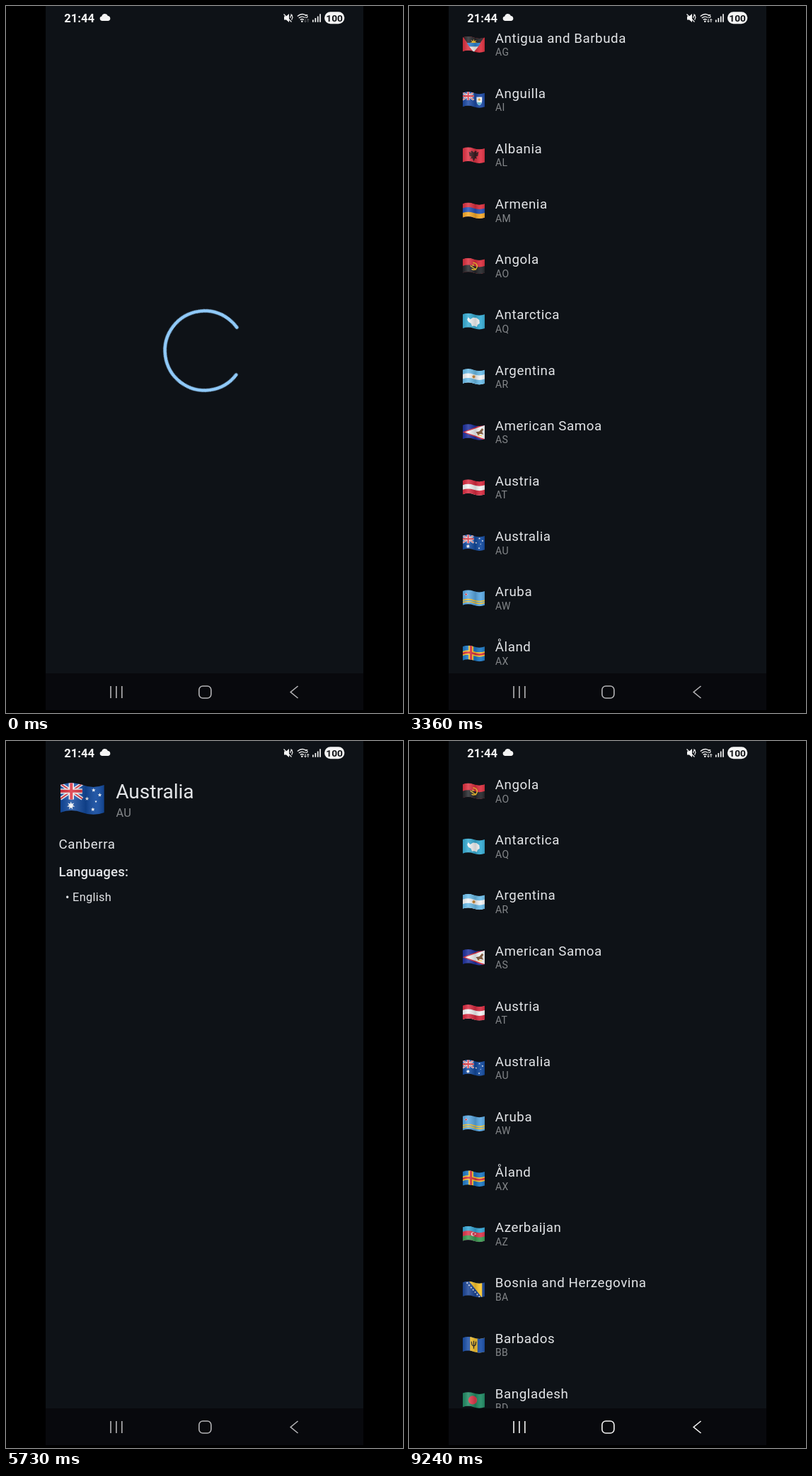
These frames come from a looping animation (561x998 px, 9.27 s). An HTML page:

```html
<!DOCTYPE html>
<html lang="en">
<head>
<meta charset="utf-8">
<title>Country list</title>
<style>
  html, body { margin: 0; width: 100%; height: 100%; overflow: hidden; background: #000; }
  svg { display: block; width: 100vw; height: 100vh; font-family: Roboto, sans-serif; }
  .name { font-size: 18.7px; letter-spacing: .584px; fill: #e3e5e8; }
  .code { font-size: 14.03px; letter-spacing: .468px; fill: #84878a; }
  .body { font-size: 16.37px; letter-spacing: .29px; fill: #e3e5e8; }
  .title { font-size: 28.05px; fill: #e3e5e8; }
  .label { font-size: 18.7px; font-weight: 500; letter-spacing: .175px; fill: #e3e5e8; }
  .bold { font-weight: 700; }

  /* One shared 9.27 s loop; 1 % is 92.7 ms. */
  .anim { animation: 9.27s linear infinite; }
  #loader { animation-name: loader; }
  #spin { animation-name: spin; transform-origin: 280.7px 486.5px; }
  #arc { animation-name: arc; }
  #arrows { animation-name: arrows; }
  #list { animation-name: list; }
  #rows { animation-name: scroll; }
  #detail { animation-name: detail; }
  #ripple { animation-name: ripple; transform-box: fill-box; transform-origin: center; }
  #press { animation-name: press; }
  #nav { animation-name: nav; }
  #touch { animation-name: touch; }

  @keyframes loader { 0%, 13.37% { opacity: 1 } 13.376%, 100% { opacity: 0 } }
  @keyframes spin {
    0% { transform: rotate(37.1deg) }
    7.551%, 100% { transform: rotate(187.4deg) }
  }
  @keyframes arc {
    0% { stroke-dasharray: 287 400; stroke-dashoffset: 0 }
    .798% { stroke-dasharray: 290 400; stroke-dashoffset: 0; animation-timing-function: cubic-bezier(.4, 0, .2, 1) }
    7.983%, 100% { stroke-dasharray: .5 400; stroke-dashoffset: -289.5 }
  }
  @keyframes arrows { 0%, 9.81% { opacity: .35 } 9.817%, 100% { opacity: 1 } }
  @keyframes list {
    0%, 13.37% { opacity: 0 }
    13.376% { opacity: 1 }
    53.614% { opacity: 1; animation-timing-function: cubic-bezier(.4, 0, .2, 1) }
    61.165%, 87.594% { opacity: 0; animation-timing-function: cubic-bezier(.4, 0, .2, 1) }
    91.154%, 100% { opacity: 1 }
  }
  @keyframes detail {
    0% { opacity: 0 }
    53.614% { opacity: 0; animation-timing-function: cubic-bezier(.4, 0, .2, 1) }
    61.165%, 87.594% { opacity: 1; animation-timing-function: cubic-bezier(.4, 0, .2, 1) }
    91.154%, 100% { opacity: 0 }
  }
  @keyframes scroll {
    0%, 32.03% { transform: translateY(0) }
    32.039% { transform: translateY(-20px) }
    33.765% { transform: translateY(-145px) }
    34.951% { transform: translateY(-200px) }
    36.246% { transform: translateY(-248.5px) }
    37.756% { transform: translateY(-286px) }
    40.129% { transform: translateY(-318px) }
    40.561% { transform: translateY(-320px) }
    42.071% { transform: translateY(-361px) }
    43.15% { transform: translateY(-398px) }
    44.444% { transform: translateY(-416px); animation-timing-function: ease-out }
    46.71%, 93.2% { transform: translateY(-424.4px) }
    93.528% { transform: translateY(-438px) }
    94.822% { transform: translateY(-489.9px) }
    96.009% { transform: translateY(-527px) }
    97.303% { transform: translateY(-539px); animation-timing-function: ease-out }
    99.676%, 100% { transform: translateY(-545px) }
  }
  @keyframes ripple {
    0%, 51.67% { opacity: 0; transform: scale(.6) }
    52.5% { opacity: .1; transform: scale(.8) }
    54.1% { opacity: .1; transform: scale(1) }
    56.3%, 100% { opacity: 0; transform: scale(1) }
  }
  @keyframes press {
    0%, 81.12% { opacity: 0 }
    82%, 83.2% { opacity: .14 }
    85.653%, 100% { opacity: 0 }
  }
  @keyframes nav { 0%, 81.12% { stroke: #b4b4b6 } 81.5%, 100% { stroke: #f4f4f4 } }
  @keyframes touch {
    0%, 32.03% { opacity: 0; transform: translate(152px, 650px) }
    32.039% { opacity: 1; transform: translate(152px, 650px) }
    33.765% { opacity: 1; transform: translate(158px, 530px) }
    35.7% { opacity: 0; transform: translate(158px, 530px) }
    40.12% { opacity: 0; transform: translate(125px, 660px) }
    40.129% { opacity: 1; transform: translate(125px, 660px) }
    40.561% { opacity: 1; transform: translate(124px, 655px) }
    43.15% { opacity: 1; transform: translate(101px, 547px) }
    46.71% { opacity: .03; transform: translate(101px, 547px) }
    51.66% { opacity: .03; transform: translate(101px, 547px) }
    51.672% { opacity: 1; transform: translate(300px, 580px) }
    52.6% { opacity: 1; transform: translate(300px, 580px) }
    54.5% { opacity: 0; transform: translate(300px, 580px) }
    81.11% { opacity: 0; transform: translate(410px, 968px) }
    81.122%, 82.2% { opacity: 1; transform: translate(410px, 968px) }
    84.5% { opacity: 0; transform: translate(410px, 968px) }
    93.19% { opacity: 0; transform: translate(157px, 690px) }
    93.204% { opacity: 1; transform: translate(157px, 690px) }
    94.822% { opacity: 1; transform: translate(150px, 614px) }
    96.009% { opacity: 1; transform: translate(137px, 572px) }
    99.676%, 100% { opacity: 0; transform: translate(137px, 572px) }
  }
</style>
</head>
<body>
<svg viewBox="0 0 561 998">
  <defs>
    <clipPath id="wave"><path d="M0 0q8-3 16 0t16 0v20q-8 3-16 0t-16 0z"/></clipPath>
    <clipPath id="page"><rect x="56" y="30" width="449" height="912"/></clipPath>
    <clipPath id="row"><rect x="56" y="543" width="449" height="78"/></clipPath>
    <linearGradient id="shade">
      <stop offset="0" stop-opacity=".1"/>
      <stop offset=".25" stop-color="#fff" stop-opacity=".16"/>
      <stop offset=".58" stop-opacity=".16"/>
      <stop offset=".82" stop-color="#fff" stop-opacity=".08"/>
      <stop offset="1" stop-opacity=".14"/>
    </linearGradient>
  </defs>

  <rect width="561" height="998"/>
  <rect x="56" width="449" height="942" fill="#0e1217"/>
  <rect x="56" y="942" width="449" height="52" fill="#08090d"/>

  <g id="loader" class="anim">
    <g id="spin" class="anim">
      <circle id="arc" class="anim" cx="280.7" cy="486.5" r="56.1" pathLength="360" fill="none"
        stroke="#90caf9" stroke-width="4.68" stroke-linecap="round"/>
    </g>
  </g>

  <g clip-path="url(#page)">
    <g id="list" class="anim">
      <g clip-path="url(#row)"><circle id="ripple" class="anim" cx="290" cy="582" r="216" fill="#fff"/></g>
      <g id="rows" class="anim"></g>
    </g>
    <g id="detail" class="anim">
      <g id="hero" transform="translate(76.8 62.1) scale(1.94)"></g>
      <text x="155.2" y="80.6" class="title">Australia</text>
      <text x="155.4" y="107" class="body" style="fill:#84878a">AU</text>
      <text x="74.4" y="152" class="name">Canberra</text>
      <text x="74.4" y="191" class="label">Languages:</text>
      <text x="83.9" y="226" class="body">• English</text>
    </g>
  </g>

  <g fill="#f4f4f4">
    <text x="82.3" y="22.6" class="bold" font-size="16.6">21:44</text>
    <path d="M135.5 21a3.3 3.3 0 0 1-.2-6.5 4.6 4.6 0 0 1 8.7-.6 3.6 3.6 0 0 1 .5 7.1z"/>
    <path d="M393 14.5h3l4-3.5v12l-4-3.600h-3z"/>
    <path d="M392.500 11.500l11 11M402.500 11.500q1.500 1.200 0 2.700t0 2.700M404.500 12.500q-1 1.200 0 2.400t0 2.400-.5 2.400" fill="none" stroke="#f4f4f4" stroke-width="1.2"/>
    <path d="M411.800 14.500q6-5 11.500-1.500M413.800 17q4.500-3.500 8.500-.5M415.800 19.500q2.500-2 5 0" fill="none" stroke="#f4f4f4" stroke-width="1.4"/>
    <circle cx="418.300" cy="21.800" r="1.300"/>
    <text x="422.300" y="16.800" class="bold" font-size="8">5</text>
    <path id="arrows" class="anim" d="M423 18.200v4.600m-1.500-1.500l1.500 1.500 1.500-1.500M426.800 23v-4.600m-1.500 1.500l1.500-1.500 1.500 1.500" fill="none" stroke="#f4f4f4"/>
    <path d="M433.800 22.800v-3.300M437.300 22.800v-5.800M440.700 22.800v-8.300M444 22.800v-11.600" stroke="#f4f4f4" stroke-width="1.7"/>
    <rect x="450" y="8.200" width="28.300" height="17" rx="8.500"/>
    <text x="464.100" y="21.700" class="bold" font-size="13.700" text-anchor="middle" fill="#101216">100</text>
  </g>

  <rect id="press" class="anim" x="341" y="942" width="132" height="56" rx="28" fill="#fff"/>
  <g id="nav" class="anim" fill="none" stroke-width="1.6">
    <path d="M148 960v17M155.900 960v17M163.800 960v17"/>
    <rect x="272.800" y="960" width="17" height="17" rx="5.300"/>
    <path d="M412.500 960l-10.300 8.500 10.300 8.500"/>
  </g>

  <circle id="touch" class="anim" r="10.2" fill="#a9a9ac" fill-opacity=".93" stroke="#7fa9da"/>
</svg>

<script>
// Flags are drawn on a 32 x 20 field and clipped to a waving outline.
const band = (y, h, c) => `<path d="M0 ${y}q8-3 16 0t16 0v${h}q-8 3-16 0t-16 0z" fill="${c}"/>`;
const bands = (...cs) => cs.map((c, i) => band(i * 20 / cs.length, 20 - i * 20 / cs.length, c)).join('');
const bar = (x, w, c) => `<rect x="${x}" y="-2" width="${w}" height="24" fill="${c}"/>`;
const bars = (...cs) => cs.map((c, i) => bar(i * 32 / cs.length, 32 - i * 32 / cs.length, c)).join('');
const dot = (x, y, r, c) => `<circle cx="${x}" cy="${y}" r="${r}" fill="${c}"/>`;
const shape = (d, c) => `<path d="${d}" fill="${c}"/>`;
const line = (d, c, w) => `<path d="${d}" fill="none" stroke="${c}" stroke-width="${w}"/>`;

function star(x, y, r, c, n = 5) {
  const pts = Array.from({ length: 2 * n }, (_, i) => {
    const a = i * Math.PI / n - Math.PI / 2, k = i % 2 ? r * .45 : r;
    return `${(x + k * Math.cos(a)).toFixed(2)},${(y + k * Math.sin(a)).toFixed(2)}`;
  });
  return `<polygon points="${pts.join(' ')}" fill="${c}"/>`;
}

const red = '#dc2f3e', white = '#f4f5f6', black = '#25262a', yellow = '#fbc62e', sky = '#6bbdea';

const diagonals = 'M0-1L16 10M16-1L0 10', cross = 'M8-2V10.500M0 4.500H16';
const jack = '<g>' + shape('M0-2H16V10.500H0z', '#1b55b0') + line(diagonals, white, 2.5) + line(diagonals, red, .9)
  + line(cross, white, 3.8) + line(cross, red, 2.1) + '</g>';

const countries = [
  ['AD', 'Andorra', bars('#1558bd', yellow, red) + dot(16, 10, 3.6, '#c9803a') + dot(16, 10, 2, '#e7a656')],
  ['AE', 'United Arab Emirates', bands('#1c8a4a', white, black) + bar(0, 8.5, red)],
  ['AF', 'Afghanistan', bars(black, red, '#21914a') + dot(16, 10, 3.8, '#f3d6d6') + dot(16, 10, 2.2, red) + dot(16, 10.5, 1.2, white)],
  ['AG', 'Antigua and Barbuda', bar(0, 32, red) + shape('M0-2H32L16 21z', black) + star(16, 7.5, 5.5, yellow, 8)
    + shape('M6 7.500H26L22.500 13H9.500z', '#2b83d2') + shape('M9.500 13H22.500L16 21z', white)],
  ['AI', 'Anguilla', bar(0, 32, '#1c49a4') + jack + shape('M20 6h8v5q0 5-4 7-4-2-4-7z', white)
    + shape('M20.500 13.500h7q-1 3-3.500 4.300-2.500-1.300-3.500-4.300z', '#62bdd8') + dot(24, 9.5, 1.8, '#e8a33b')],
  ['AL', 'Albania', bar(0, 32, '#e03244')
    + shape('M16 6l-2.500-2.500-2 1 1.500 2-4-1.500 1 6 3 1-2 3 3-.5 2 4.500 2-4.500 3 .500-2-3 3-1 1-6-4 1.500 1.500-2-2-1z', '#391a20')],
  ['AM', 'Armenia', bands(red, '#2150b8', '#f7a928')],
  ['AO', 'Angola', bands(red, black) + line('M15 5.500a5 5 0 1 1-2 9', yellow, 1.5) + line('M11 9.500l8.500 6', yellow, 1.4) + star(15, 9, 1.8, yellow)],
  ['AQ', 'Antarctica', bar(0, 32, '#36acd4')
    + shape('M8 4l3 3 4-2.500 5 .5 4 3 .500 5-3 2-1 3-4-1.500-3 .5-1.500-4-3.500-2-2-3.500z', white)],
  ['AR', 'Argentina', bands(sky, white, sky) + star(16, 10, 3.2, '#d99a3d', 10) + dot(16, 10, 1.6, '#c98332')],
  ['AS', 'American Samoa', bar(0, 32, '#1d2f9c') + shape('M0 10L32-2V22z', red) + shape('M3.500 10L32 0V20z', white)
    + shape('M19 10l5-1 4-4.500 2 2-2 3 2 4-5-1-3 2.500-1-3z', '#7a5236') + line('M22 14.500l6 1', yellow, 1.2)],
  ['AT', 'Austria', bands('#d92b40', white, '#d92b40')],
  ['AU', 'Australia', bar(0, 32, '#124a9f') + jack + star(7.7, 15, 3, white, 7) + star(24.2, 3.8, 1.5, white)
    + star(19.4, 10, 1.5, white) + star(28.7, 7.3, 1.5, white) + star(25.9, 12, .9, white) + star(23.7, 17.8, 1.5, white)],
  ['AW', 'Aruba', bar(0, 32, '#5aa9e4') + band(12.5, 1.6, yellow) + band(15.6, 1.6, yellow)
    + star(5, 4.6, 2.8, white, 4) + star(5, 4.6, 2.1, red, 4)],
  ['AX', 'Åland', bar(0, 32, '#1d78c4') + bar(8.5, 7, yellow) + band(6.8, 6.4, yellow) + bar(10.5, 3, red) + band(8.6, 2.8, red)],
  ['AZ', 'Azerbaijan', bands('#35a6d6', '#e0364c', '#3b9b52') + dot(15, 10, 2.8, white) + dot(15.9, 10, 2.2, '#e0364c') + star(18.2, 10, 1.6, white, 8)],
  ['BA', 'Bosnia and Herzegovina', bar(0, 32, '#1b4596') + shape('M9-2H28V22z', yellow)
    + Array.from({ length: 7 }, (_, i) => star(6.5 + i * 2.9, .8 + i * 3.3, 1.5, white)).join('')],
  ['BB', 'Barbados', bars('#1a4fa8', yellow, '#1a4fa8') + line('M16 4.500V15.500M12.800 5.500q0 6 3.200 6.500 3.200-.5 3.200-6.500', black, 1.3)],
  ['BD', 'Bangladesh', bar(0, 32, '#1f8a63') + dot(14.5, 10, 6.3, '#e23a4c')],
];

const flag = art => `<g clip-path="url(#wave)">${art}<rect y="-2" width="32" height="24" fill="url(#shade)"/></g>`;

const pitch = 78.15;
document.getElementById('rows').innerHTML = countries.map(([code, name, art], i) => `
  <g transform="translate(0 ${(i * pitch).toFixed(2)})">
    <g transform="translate(75.8 58.9) scale(.98)">${flag(art)}</g>
    <text x="121.8" y="66" class="name">${name}</text>
    <text x="121.900" y="84.500" class="code">${code}</text>
  </g>`).join('');
document.getElementById('hero').innerHTML = flag(countries.find(c => c[0] === 'AU')[2]);
</script>
</body>
</html>
```
